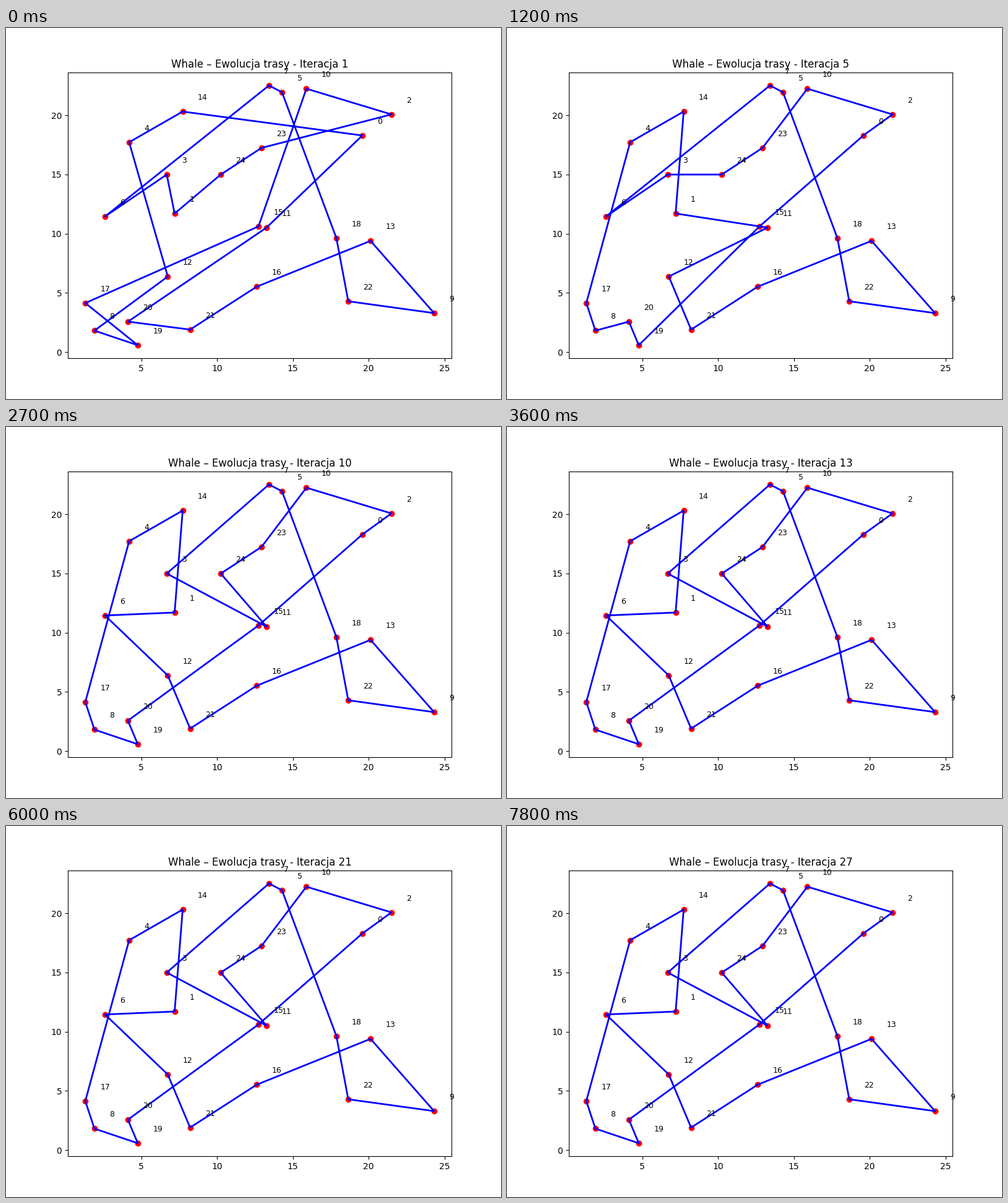
Write a matplotlib script that moves like this. It is 800 px wide and 600 px high and loops after 8000 ms.

```python
import matplotlib.pyplot as plt
import numpy as np
from matplotlib.animation import FuncAnimation

TICK_MS = 100
LOOP_MS = 8000
STEP_MS = 300

CITIES = np.array([
    (19.58, 18.29), (7.20, 11.70), (21.50, 20.07), (6.68, 14.99), (4.20, 17.72),
    (14.28, 21.94), (2.61, 11.45), (13.42, 22.51), (1.91, 1.81), (24.31, 3.29),
    (15.89, 22.24), (13.26, 10.51), (6.75, 6.38), (20.12, 9.39), (7.73, 20.31),
    (12.73, 10.61), (12.61, 5.52), (1.31, 4.14), (17.87, 9.62), (4.77, 0.58),
    (4.12, 2.57), (8.22, 1.90), (18.65, 4.29), (12.93, 17.24), (10.24, 14.99),
])
START_TOUR = [7, 5, 18, 22, 9, 13, 16, 21, 20, 11, 0, 14, 4,
              12, 8, 19, 17, 15, 10, 2, 23, 24, 1, 3, 6]

# The search shortens the route by swapping pairs of cities.
SWAPS = {
    3: [(12, 20), (17, 20)],
    5: [(19, 20), (0, 10), (10, 1), (10, 24), (10, 23)],
    7: [(19, 20), (3, 6)],
    10: [(6, 11)],
}


def best_tour(iteration):
    tour = START_TOUR.copy()
    for start, pairs in SWAPS.items():
        if start <= iteration:
            for a, b in pairs:
                i, j = tour.index(a), tour.index(b)
                tour[i], tour[j] = b, a
    return tour + tour[:1]


fig, ax = plt.subplots(figsize=(8, 6), dpi=100)
ax.scatter(*CITIES.T, c="red")
route, = ax.plot(*CITIES[best_tour(1)].T, "b-", lw=2)
for number, (x, y) in enumerate(CITIES):
    ax.text(x + 1, y + 1, str(number), fontsize=9)
title = ax.set_title("")


def update(frame):
    iteration = frame * TICK_MS // STEP_MS + 1
    route.set_data(*CITIES[best_tour(iteration)].T)
    title.set_text(f"Whale – Ewolucja trasy - Iteracja {iteration}")
    return route, title


anim = FuncAnimation(fig, update, frames=LOOP_MS // TICK_MS,
                     interval=TICK_MS, repeat=True, repeat_delay=0)
plt.show()
```
